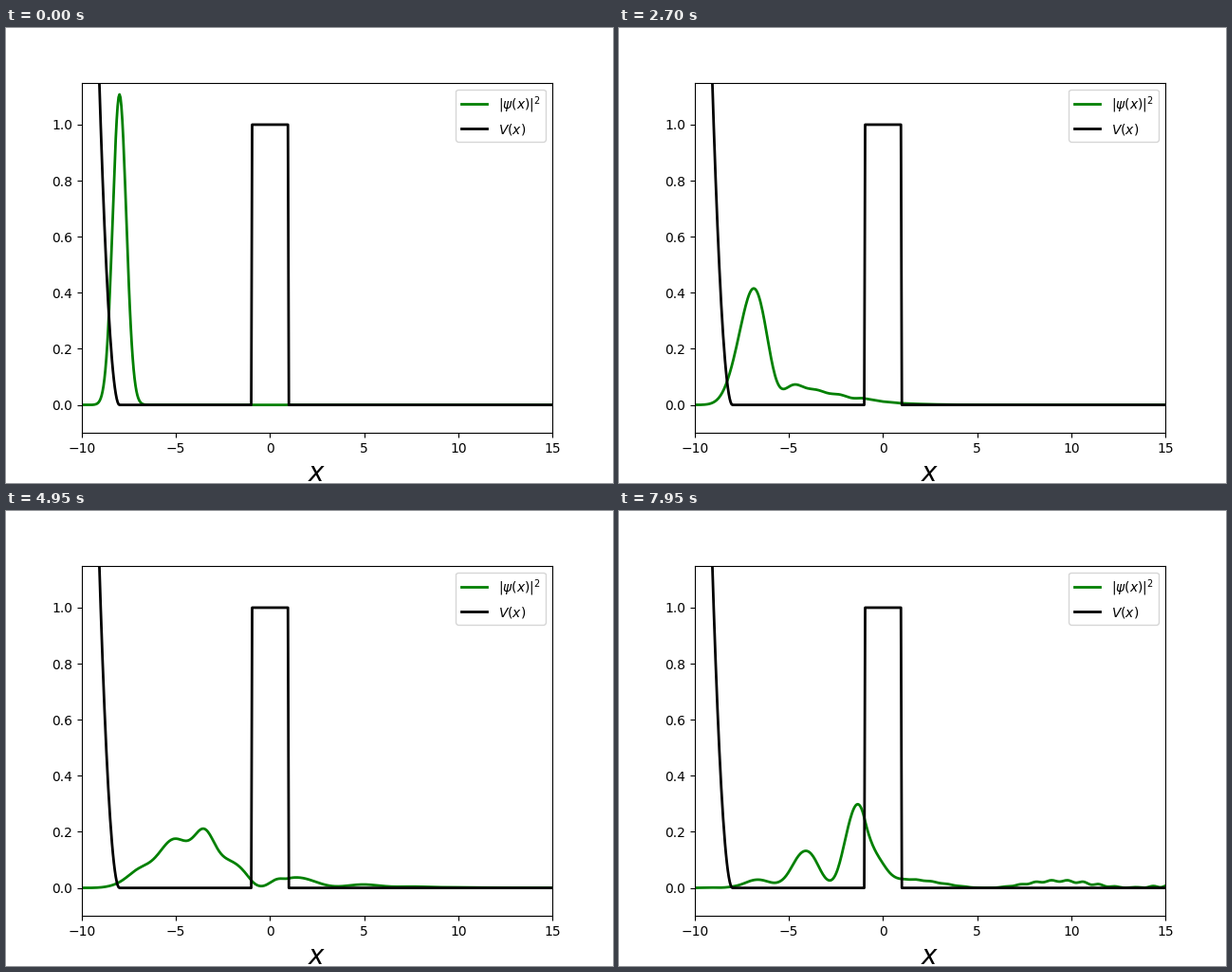
Recreate the animation shown at these times as a matplotlib script. Size 640 by 480 pixels, loop 8 s.

```python
import numpy as np
import matplotlib.pyplot as plt
from matplotlib.animation import FuncAnimation

FRAMES, INTERVAL = 160, 50
DT, SUBSTEPS = 0.05, 20

# Spatial grid, potential and starting wave packet (hbar = m = 1)
x = np.linspace(-20, 20, 800, endpoint=False)
dx = x[1] - x[0]
k = 2 * np.pi * np.fft.fftfreq(x.size, dx)
V = np.where(x < -8, (x + 8) ** 2, 0.0)
V[np.abs(x) < 1 - dx / 2] = 1.0
psi0 = np.exp(-2 * (x + 8) ** 2) / np.sqrt(0.5 * np.sqrt(np.pi))


def evolve(psi):
    """Split-step propagation; returns the density for every frame."""
    h = DT / SUBSTEPS
    half_v = np.exp(-0.5j * h * V)
    kinetic = np.exp(-0.5j * h * k ** 2)
    out = []
    for _ in range(FRAMES):
        for _ in range(SUBSTEPS):
            psi = half_v * np.fft.ifft(kinetic * np.fft.fft(half_v * psi))
        out.append(np.abs(psi) ** 2)
    return out


density = evolve(psi0.astype(complex))

fig, ax = plt.subplots(figsize=(6.4, 4.8), dpi=100)
ax.set_xlim(-10, 15)
ax.set_ylim(-0.1, 1.15)
ax.set_xlabel("$x$", fontsize=20)
wave, = ax.plot(x, density[0], color="green", lw=2, label=r"$|\psi(x)|^2$")
ax.plot(x, V, color="black", lw=2, label="$V(x)$")
ax.legend(loc="upper right")


def update(i):
    wave.set_ydata(density[i])
    return wave,


anim = FuncAnimation(fig, update, frames=FRAMES, interval=INTERVAL,
                     repeat=True, repeat_delay=0)
plt.show()
```
